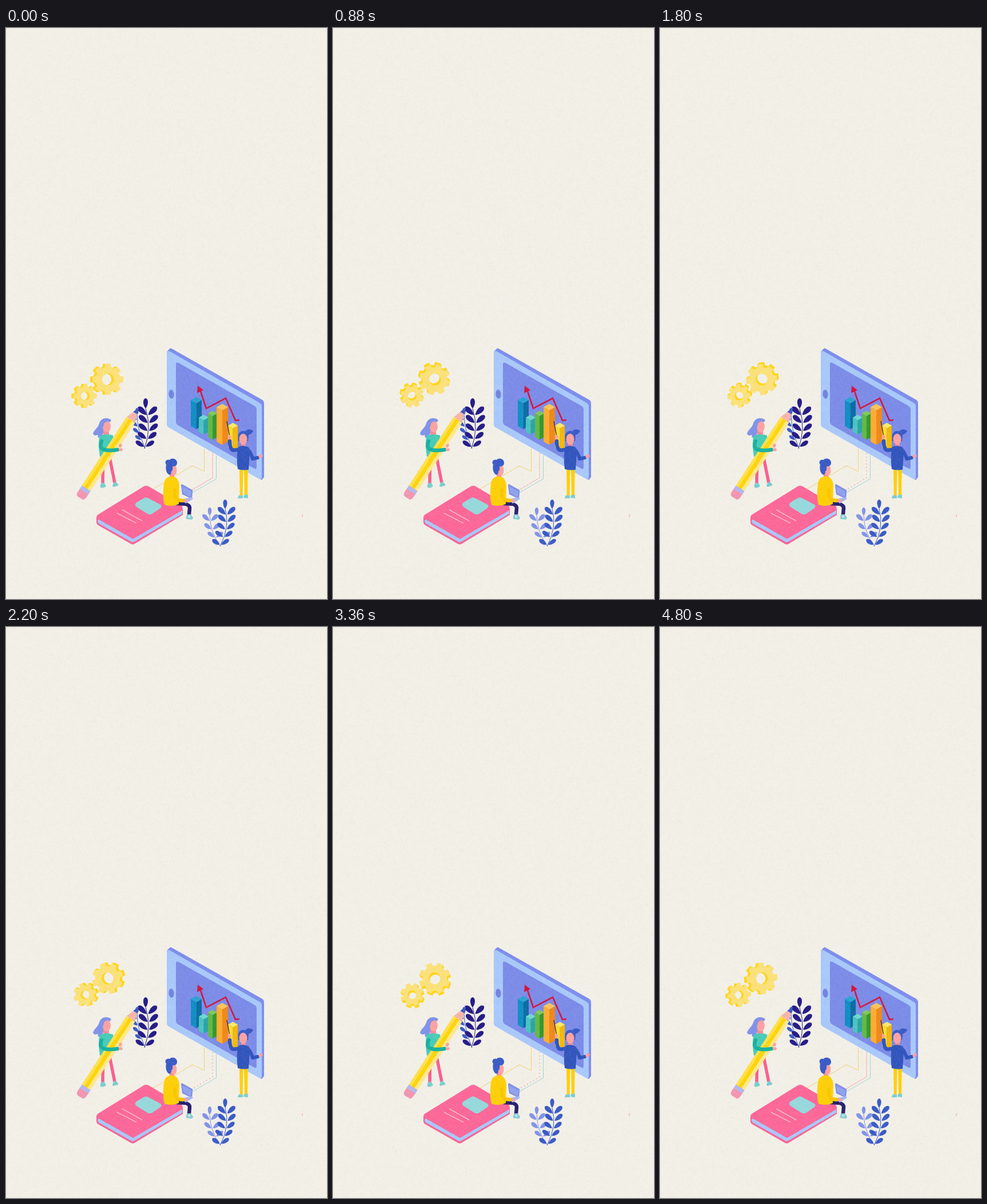
Write an HTML page with a canvas that moves like this. It is 561 px wide and 998 px high and loops after 4840 ms.

```html
<!DOCTYPE html>
<html lang="en">
<head>
<meta charset="utf-8">
<title>Learning illustration</title>
<style>
html, body { margin: 0; width: 100%; height: 100%; overflow: hidden; background: #f3f0e8; }
canvas { display: block; }
</style>
</head>
<body>
<canvas id="stage" width="561" height="998"></canvas>
<script>
const W = 561, H = 998, LOOP = 4840;
const BG = '#f3f0e8', SKIN = '#fca3a3', BLUE = '#3a5bc6', LILAC = '#8193e8', TEAL = '#7ccfd0';
const stage = document.getElementById('stage').getContext('2d');

function layer(w, h, draw) {
  const c = document.createElement('canvas');
  c.width = w;
  c.height = h;
  draw(c.getContext('2d'));
  return c;
}

const scene = layer(W, H, g => {
  const fill = (d, color) => { g.fillStyle = color; g.fill(new Path2D(d)); };
  const line = (d, color, width = 1, cap = 'butt') => {
    g.strokeStyle = color;
    g.lineWidth = width;
    g.lineCap = cap;
    g.lineJoin = cap === 'round' ? 'round' : 'miter';
    g.stroke(new Path2D(d));
  };
  const oval = (x, y, rx, ry, color, turn = 0) => {
    g.fillStyle = color;
    g.beginPath();
    g.ellipse(x, y, rx, ry, turn, 0, Math.PI * 2);
    g.fill();
  };

  function leaf(x, y, angle, length, color) {
    const w = length * .34;
    g.save();
    g.translate(x, y);
    g.rotate(angle);
    g.fillStyle = color;
    g.beginPath();
    g.moveTo(0, 0);
    g.bezierCurveTo(length * .3, -w * .75, length * .9, -w, length, 0);
    g.bezierCurveTo(length * .9, w, length * .3, w * .75, 0, 0);
    g.fill();
    g.restore();
  }

  // Pairs of leaves along a bent stem, with one more at its end.
  function plant(x0, y0, bx, by, x1, y1, pairs, size, color, sides = [-1, 1]) {
    const tipY = y1 + size * .9;
    line(`M${x0} ${y0}Q${bx} ${by} ${x1} ${tipY}`, color, 1);
    const at = t => [
      (1 - t) ** 2 * x0 + 2 * t * (1 - t) * bx + t * t * x1,
      (1 - t) ** 2 * y0 + 2 * t * (1 - t) * by + t * t * tipY
    ];
    for (let i = 0; i < pairs; i++) {
      const t = .03 + i * .79 / (pairs - 1);
      const [x, y] = at(t);
      for (const side of sides) {
        const a = -Math.PI / 2 + side * (.98 - .2 * t);
        leaf(x + 2 * Math.cos(a), y + 2 * Math.sin(a), a, size * (.86 + .2 * t), color);
      }
    }
    leaf(x1, tipY, -Math.PI / 2, size * .9, color);
  }

  function bar(x, y, w, bottom, left, right, top) {
    const m = x + w / 2, e = x + w, s = w * .28;
    fill(`M${x} ${y + s}L${m} ${y + 2 * s}V${bottom + s}L${x} ${bottom}Z`, left);
    fill(`M${e} ${y + s}L${m} ${y + 2 * s}V${bottom + s}L${e} ${bottom}Z`, right);
    fill(`M${x} ${y + s}L${m} ${y}L${e} ${y + s}L${m} ${y + 2 * s}Z`, top);
  }

  function tablet() {
    fill('M281 567Q282 563 288 559.5L448 650Q451 652 451 656V785L447 790L300 700Z', '#7d8eec');
    fill('M281 569Q281 563 286 565L443 655Q447 657 447 661V785Q447 790 442 788L284 698Q281 696 281 692Z', '#a9c9fb');
    fill('M297 588Q297 583 301 585L435 661Q438 663 438 666V768Q438 772 434 770L300 694Q297 692 297 689Z', '#7c8ce8');
    oval(289, 640, 4.6, 7.8, '#7384e2', -.1);
    bar(323, 645, 19, 696, '#108fc5', '#0a6da4', '#2ca4d4');
    bar(337, 676, 17, 706, '#4bc4bf', '#2ba5a6', '#71d8d1');
    bar(353, 669, 16, 715, '#62b947', '#36982f', '#83ca57');
    bar(368, 657, 20, 723, '#fdad30', '#ef891c', '#ffc45a');
    bar(388, 690, 17, 733, '#ffdd28', '#f4b90b', '#ffe967');
    line('M339 632L350 665L384 647L401 686L408 685', '#d2173f', 2.6);
    fill('M335 625L345 633L334 638Z', '#d2173f');
  }

  function cables() {
    line('M346.5 736V775L326 765L255 807', '#f3d36b');
    line('M367.5 747V788L326 812', '#9cd8d6');
  }

  function teacher() {
    line('M386 687L391 715', '#28245e', 1.3);
    line('M408 737L397 738Q391 736 391 722', '#3155bd', 6.5, 'round');
    oval(390.5, 715, 2.8, 4, SKIN);
    line('M423 737Q429 744 431 753L440 751', '#3155bd', 6, 'round');
    oval(445, 748.5, 4, 2.8, SKIN, -.8);
    fill('M408 769H414.5L413.5 819H408.8Z M416 769H422.7L422 818H417Z', '#ffd00a');
    fill('M405 822Q406 816 409 817H414V822Z M415 821Q416 815 418 816H423V822Z', TEAL);
    fill('M411 723H419V732H411Z', '#f38e96');
    fill('M406 732Q415 728 424 733L426 742L424 772Q414 774 405 771Q402 747 406 732Z', '#3155bd');
    fill('M406 722C403 708 410 702 419 705L424 712L423 722Z', BLUE);
    fill('M418 706C421 700 427 701 432 704C430 709 425 712 421 711Z', BLUE);
    oval(414.5, 718.5, 7, 9.5, SKIN);
  }

  function pencil() {
    g.save();
    g.translate(132, 817);
    g.rotate(Math.atan2(-152, 99));
    fill('M10 -9H1Q-4 -9 -5 -5V5Q-4 9 1 9H10Z', '#f397b2');
    fill('M8 -9H16V9H8Z', '#b4b9ed');
    fill('M15 -9H158V-4H15Z', '#ffe14a');
    fill('M15 -4H158V3H15Z', '#ffd609');
    fill('M15 3H158V9H15Z', '#ffe98b');
    fill('M157 -9L183 0L157 9Q160 6 157 3Q160 -1 157 -4Q160 -7 157 -9Z', '#f8b6aa');
    fill('M172 -4L184 0L172 4Z', BLUE);
    g.restore();
  }

  function girl() {
    line('M170 745L169 796', '#fa5f8e', 5.5);
    line('M180 745L190 795', '#fa5f8e', 5.5);
    fill('M165 803Q164 796 168 795H172L175 801Q171 805 165 803Z M186 799L190 793L194 795L197 799Q191 802 187 802Z', TEAL);
    fill('M184 685C177 680 166 681 163 691C161 699 154 702 152 709Q154 714 161 711C158 718 168 718 169 710L176 697Z', LILAC);
    fill('M170 699H180V712H170Z', '#f38e96');
    fill('M163 713Q174 708 187 712Q190 727 186 749H164Q161 730 163 713Z', '#48ccb9');
    oval(176, 696.5, 7, 10, SKIN);
    fill('M184 688C181 681 171 681 165 688L164 705Q171 698 171 691Q178 685 184 688Z', LILAC);
    pencil();
    line('M167 722Q163 733 169 736Q178 740 195 737', '#19b29f', 6.5, 'round');
    oval(200.5, 737, 3.5, 2.7, SKIN);
    oval(200, 730, 2.6, 3.6, SKIN, .5);
  }

  function book() {
    fill('M158 854L222 890L309 839V851L224 902Q222 903 219 902L161 869Q158 867 158 864Z', '#f96495');
    fill('M162 859L222 893L308 843V849L224 898Q222 899 219 898L162 866Q158 862 162 859Z', '#a8c9fa');
    fill('M160 851L241 801Q245 799 249 801L307 835Q310 838 307 841L225 891Q222 893 219 891L160 857Q157 854 160 851Z', '#fc6899');
    fill('M227 830L240 822Q245 819 249 822L270 833Q273 836 270 839L257 848Q252 852 247 849L228 837Q224 834 227 830Z', '#96d9dc');
    line('M203 842L238 861.5M194 848L228 865.5', '#f8d0da', 1.4);
  }

  function reader() {
    line('M298 831L314 832Q321 834 321 839L320 850', '#29206f', 6.5, 'round');
    fill('M315 858Q314 851 318 850H323L327 856Q326 860 322 859Z', '#8acdd8');
    oval(320, 854, 2, 1.5, '#e8f1f2');
    fill('M286 776H294V790H286Z', '#f38e96');
    fill('M280 787Q288 781 296 785Q302 789 303 800L302 832Q290 838 277 833Q273 820 276 796Q277 790 280 787Z', '#fed009');
    fill('M306 800Q306 796 309 798L325 807Q327 808 326 811L325 823L308 815Z', '#7e8fe6');
    fill('M308 801L324 810L323 820L310 813Z', '#91a3ef');
    fill('M306 824L325 820L327 823L314 831Z', '#a8b8f2');
    line('M295 808Q294 822 300 825L309 826', '#f9c700', 6.5, 'round');
    oval(314.5, 826, 3.6, 2.6, SKIN);
    oval(293, 773, 5.5, 9.5, SKIN);
    fill('M280 763C276 758 281 753 286 755C290 750 299 753 299 760C299 765 295 767 291 766Q292 773 289 775Q289 780 286 781C281 780 278 771 280 763Z', BLUE);
  }

  plant(243, 735, 230, 704, 229, 664, 5, 14, BLUE, [-1]);
  plant(242, 735, 255, 700, 244, 647, 5, 20, '#251b87');
  tablet();
  cables();
  teacher();
  girl();
  book();
  reader();
  plant(375, 906, 357, 882, 356, 838, 4, 16, LILAC);
  plant(374, 906, 392, 872, 383, 824, 5, 18, BLUE);
  line('M518 850V855', '#f79aab', 1);
});

const grain = layer(281, 499, g => {
  const img = g.createImageData(281, 499);
  let seed = 7;
  for (let i = 0; i < img.data.length; i += 4) {
    seed = (seed * 1664525 + 1013904223) >>> 0;
    const v = seed / 2 ** 32 - .5;
    img.data.fill(v > 0 ? 255 : 90, i, i + 3);
    img.data[i + 3] = Math.abs(v) * (v > 0 ? 28 : 14);
  }
  g.putImageData(img, 0, 0);
});

function gearPath(radius, root, hole) {
  const p = new Path2D(), teeth = 8, step = Math.PI * 2 / teeth;
  const corners = [[-.32, root], [-.22, radius], [.22, radius], [.32, root]];
  for (let i = 0; i < teeth; i++)
    for (const [k, r] of corners) {
      const a = (i + k) * step;
      p.lineTo(r * Math.cos(a), r * Math.sin(a));
    }
  p.closePath();
  p.moveTo(hole, 0);
  p.arc(0, 0, hole, 0, Math.PI * 2, true);
  return p;
}

const gears = [
  { x: 138.3, y: 643, depth: 3.6, path: gearPath(20.5, 16, 7.6) },
  { x: 177.8, y: 614.2, depth: 4, path: gearPath(27.3, 21.8, 10.4) }
];

// The face turns about its centre; the rim behind it swings round with the teeth.
function drawGear({ x, y, depth, path }, angle) {
  stage.save();
  stage.translate(x, y);
  stage.rotate(angle);
  stage.translate(-depth, 0);
  stage.fillStyle = '#fed71d';
  for (let d = 0; d < depth; d += .4) {
    stage.fill(path, 'evenodd');
    stage.translate(.4, 0);
  }
  stage.fillStyle = '#fce27a';
  stage.fill(path, 'evenodd');
  stage.restore();
}

const dotPath = [[361, 744], [361, 786], [324, 808]];

function drawDots(phase) {
  const extra = Math.sqrt(Math.max(0, Math.cos(phase)));
  let n = 0;
  for (let i = 1; i < dotPath.length; i++) {
    const [ax, ay] = dotPath[i - 1], [bx, by] = dotPath[i];
    const count = Math.round(Math.hypot(bx - ax, by - ay) / 3);
    for (let k = 0; k < count; k++, n++) {
      stage.fillStyle = `rgba(240,105,125,${n % 2 ? extra * .85 : .85})`;
      stage.fillRect(ax + (bx - ax) * k / count - .6, ay + (by - ay) * k / count - .6, 1.3, 1.3);
    }
  }
}

function render(t) {
  const step = t < 100 ? 0 : 1 + Math.floor((t - 100) / 30);
  const angle = step / 159 * Math.PI * 2;
  stage.fillStyle = BG;
  stage.fillRect(0, 0, W, H);
  stage.drawImage(scene, 0, 0);
  drawDots(angle);
  gears.forEach(gear => drawGear(gear, angle));
  stage.drawImage(grain, 0, 0, W, H);
}

let start;
function frame(now) {
  start ??= now;
  render((now - start) % LOOP);
  requestAnimationFrame(frame);
}
requestAnimationFrame(frame);
</script>
</body>
</html>
```
